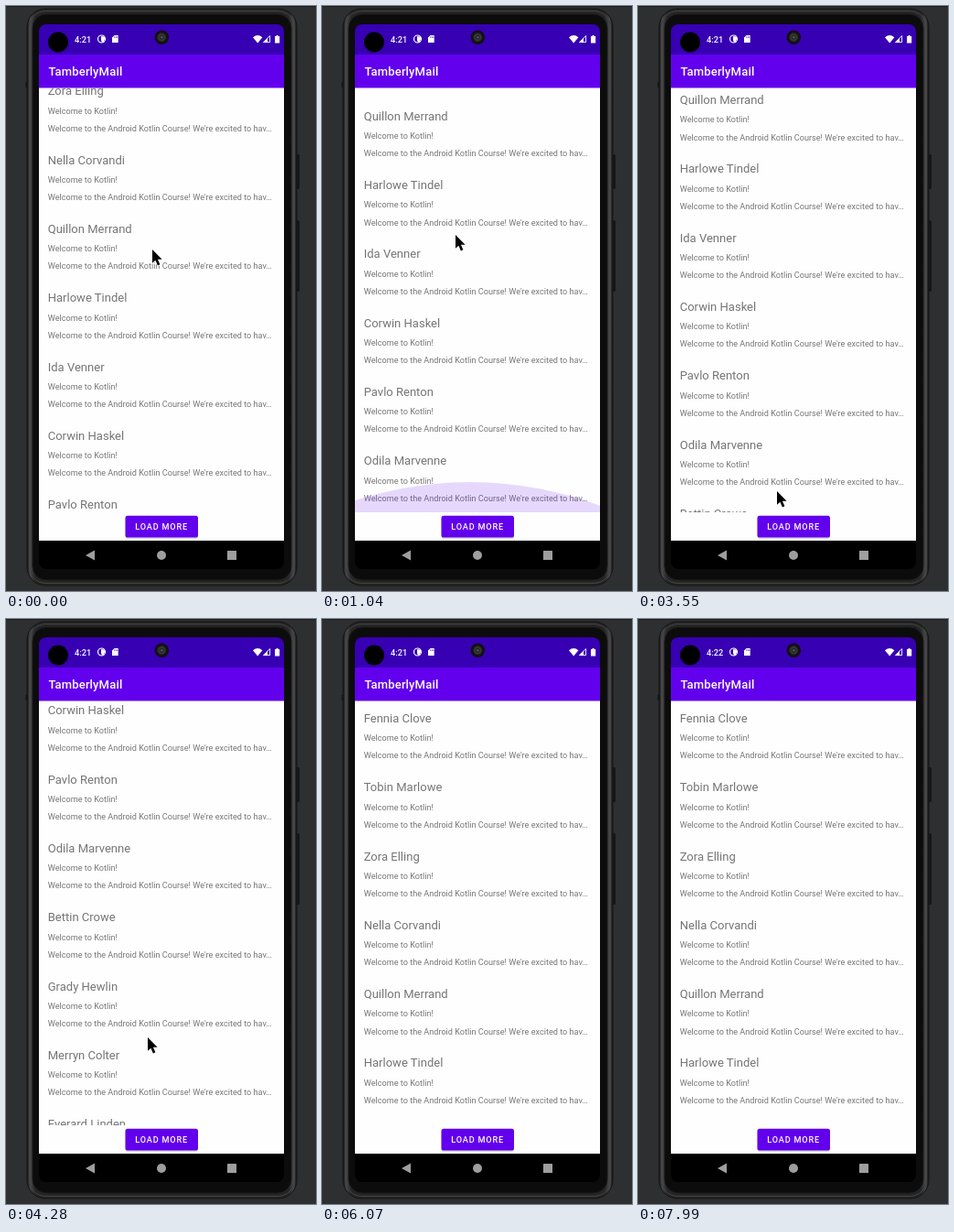
Animation, 339 px wide and 639 px high, one loop 9.03 s. Source, as an HTML page:

```html
<!DOCTYPE html>
<html lang="en">
<head>
<meta charset="utf-8">
<title>Mail list</title>
<style>
  html, body { margin: 0; width: 100%; height: 100%; overflow: hidden; background: #2d2f31; }
  svg { display: block; width: 339px; height: 639px; font-family: Roboto, "Noto Sans", sans-serif; }
  .name { font-size: 13.04px; }
  .line { font-size: 9.13px; }
  #rows { fill: #757575; }
  .medium { font-weight: 500; fill: #fff; }
</style>
</head>
<body>
<svg viewBox="0 0 339 639" xmlns="http://www.w3.org/2000/svg">
  <defs>
    <clipPath id="screen"><rect x="36" y="20" width="268" height="595" rx="8"/></clipPath>
    <clipPath id="view"><rect x="36" y="89.5" width="268" height="463.5"/></clipPath>
    <linearGradient id="rim">
      <stop offset="0" stop-color="#161616"/>
      <stop offset=".012" stop-color="#474747"/>
      <stop offset=".03" stop-color="#252525"/>
      <stop offset=".97" stop-color="#252525"/>
      <stop offset=".988" stop-color="#474747"/>
      <stop offset="1" stop-color="#161616"/>
    </linearGradient>
    <radialGradient id="lens">
      <stop offset="0" stop-color="#777"/>
      <stop offset=".3" stop-color="#222"/>
      <stop offset=".6" stop-color="#3a3a3a"/>
      <stop offset="1" stop-color="#151515"/>
    </radialGradient>
  </defs>

  <!-- Phone body -->
  <rect width="339" height="1" fill="#1e1f21"/>
  <g fill="#161616">
    <rect x="317" y="162" width="4" height="38" rx="1.5"/>
    <rect x="317" y="234" width="4" height="78" rx="1.5"/>
    <rect x="21.5" y="83" width="3" height="6"/>
  </g>
  <rect x="23" y="3" width="295" height="630" rx="20" fill="url(#rim)" stroke="#141414"/>
  <rect x="25.5" y="5.5" width="290" height="625" rx="18" fill="none" stroke="#444"/>
  <rect x="29" y="9" width="283" height="618" rx="15" fill="#0c0c0c" stroke="#1b1b1b"/>

  <g clip-path="url(#screen)">
    <rect x="36" y="20" width="268" height="34" fill="#3700b3"/>
    <rect x="36" y="53" width="268" height="37" fill="#6200ee"/>
    <rect x="36" y="89.5" width="268" height="495" fill="#fefefe"/>
    <rect x="36" y="584" width="268" height="31" fill="#000"/>

    <text class="medium" x="46.5" y="76" font-size="13.04" letter-spacing=".16">TamberlyMail</text>

    <g clip-path="url(#view)">
      <g id="rows"></g>
      <g fill="#6200ee">
        <g id="low"><circle cx="162" cy="369" r="402"/></g>
        <g id="high"><circle cx="170" cy="-369" r="402"/></g>
      </g>
    </g>

    <rect x="130.5" y="558" width="79.5" height="24" rx="3" fill="#000" opacity=".14"/>
    <rect x="130.5" y="556.8" width="79.5" height="23.8" rx="2.6" fill="#6200ee"/>
    <rect id="press" x="130.5" y="556.8" width="79.5" height="23.8" rx="2.6" fill="#fff"/>
    <text class="medium" x="141.3" y="572" font-size="9.13" letter-spacing=".81">LOAD MORE</text>

    <g fill="#9e9e9e">
      <path d="M87 600 L97 594.5 V605.5 Z"/>
      <circle cx="170" cy="600" r="5"/>
      <rect x="242" y="595" width="10" height="10" rx=".5"/>
    </g>

    <!-- Status bar -->
    <text id="clock" class="medium" x="75" y="39.8" font-size="9.2">4:21</text>
    <circle cx="104.5" cy="36" r="4" fill="none" stroke="#fff" stroke-width="1.2"/>
    <path d="M104 33.2 H106 A2.3 2.3 0 0 1 106 37.8 H104 Z M104.5 37 H107 V39.5 H104.5 Z" fill="#fff"/>
    <path d="M118.5 32 H122.7 V40 H116 V34.5 Z" fill="#fff"/>
    <path d="M118.7 33.2 V35 M120.2 33.2 V35 M121.7 33.2 V35" stroke="#3700b3" stroke-width=".6"/>
    <path d="M270 34.2 Q275.2 29.8 280.4 34.2 L275.2 40.4 Z" fill="#fff"/>
    <path d="M281.5 39.6 L288.6 32.5 V39.6 Z" fill="none" stroke="#fff" stroke-width=".9"/>
    <path d="M281.5 39.6 L286 35.1 V39.6 Z" fill="#fff"/>
    <path d="M294 33 H295.6 V32 H297.6 V33 H299.2 V40.5 H294 Z" fill="#fff"/>
    <circle cx="57" cy="39.5" r="11" fill="#000"/>
  </g>

  <circle cx="170.3" cy="34.2" r="7.8" fill="#111"/>
  <circle cx="170.3" cy="34.2" r="5.4" fill="url(#lens)"/>

  <g id="cursor">
    <path d="M0 0 V14.8 L3.4 11.7 L5.9 17.4 L8.4 16.3 L5.9 10.8 H10.6 Z"
      fill="#000" stroke="#fff" stroke-width="1.7" stroke-linejoin="round" paint-order="stroke"/>
  </g>
</svg>

<script>
const LOOP = 9030, STEP = 147.8, PITCH = 75.3;
const names = ["Fennia Clove", "Tobin Marlowe", "Zora Elling", "Nella Corvandi",
  "Quillon Merrand", "Harlowe Tindel", "Ida Venner", "Corwin Haskel", "Pavlo Renton",
  "Odila Marvenne", "Bettin Crowe", "Grady Hewlin", "Merryn Colter", "Everard Linden",
  "Lisando Fenck"];

// Each row: step, then one or more values
const scroll = [[0, 166.1], [2, 225], [4, 266], [6, 289.2], [22, 289.2], [23, 293],
  [24, 307], [26, 400], [28, 500], [29, 535.6], [30, 590], [31, 640], [32, 665.5],
  [34, 665.5], [35, 650], [36, 613.9], [37, 420], [38, 190], [39, 42], [40, 0]];
const pointer = [[0, 160, 266], [4, 150, 252], [7, 146, 250], [8, 146, 251],
  [14, 149, 520], [16, 150, 564], [18, 150, 562], [21, 151, 564], [24, 152, 530],
  [29, 155, 457], [31, 156, 440], [34, 160, 440], [36, 167, 520], [37, 172, 574],
  [38, 172, 700], [41, 190, 700], [42, 190, 525], [47, 223, 207], [48, 272, 330],
  [50, 247, 591], [51, 247, 591], [53, 247, 622], [54, 247, 700]];
const lowGlow = [[5, 0], [6, .6], [7, 1], [8, .8], [12, 0], [31, 0], [32, .9], [33, .6], [35, 0]];
const highGlow = [[39, 0], [40, .5], [41, 0]];
const press = [[15, 0], [17, .12], [18, .2], [19, .2], [21, 0]];

const el = id => document.getElementById(id);

function addText(cls, y, text) {
  const node = document.createElementNS("http://www.w3.org/2000/svg", "text");
  node.setAttribute("class", cls);
  node.setAttribute("x", 45.7);
  node.setAttribute("y", y);
  node.textContent = text;
  el("rows").append(node);
}

names.forEach((name, i) => {
  const y = i * PITCH;
  addText("name", y + 112.9, name);
  addText("line", y + 133.2, "Welcome to Kotlin!");
  addText("line", y + 152.3, "Welcome to the Android Kotlin Course! We're excited to hav…");
});

function at(keys, n) {
  const i = keys.findIndex(k => k[0] > n);
  if (i < 0) return keys[keys.length - 1].slice(1);
  if (i === 0) return keys[0].slice(1);
  const a = keys[i - 1], b = keys[i];
  const p = (n - a[0]) / (b[0] - a[0]);
  return a.slice(1).map((v, j) => v + (b[j + 1] - v) * p);
}

function setGlow(id, y, [k]) {
  el(id).setAttribute("transform", `translate(0 ${y}) scale(1 ${k})`);
  el(id).setAttribute("opacity", .15 * k);
}

function draw(n) {
  const [x, y] = at(pointer, n);
  el("rows").setAttribute("transform", `translate(0 ${-at(scroll, n)[0]})`);
  el("cursor").setAttribute("transform", `translate(${x} ${y})`);
  el("press").setAttribute("opacity", at(press, n)[0]);
  el("clock").textContent = n < 44 ? "4:21" : "4:22";
  setGlow("low", 553, at(lowGlow, n));
  setGlow("high", 89.5, at(highGlow, n));
}

const start = performance.now();
function tick() {
  const t = (performance.now() - start) % LOOP;
  draw(Math.min(54, Math.floor((t + 10) / STEP)));
  requestAnimationFrame(tick);
}
tick();
</script>
</body>
</html>
```
